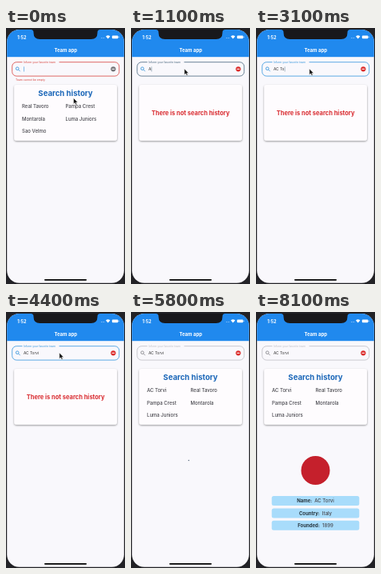
An HTML page for the animation above (8400 ms loop, 149 by 320 pixels).

```html
<!DOCTYPE html>
<html lang="en">
<head>
<meta charset="utf-8">
<title>Team app</title>
<style>
  html, body { margin: 0; width: 100%; height: 100%; overflow: hidden; background: #222226; }
  svg { display: block; width: 100vw; height: 100vh; }
  text { font-family: Inter, Roboto, sans-serif; white-space: pre; }
  .bold { font-weight: 700; }
  .mid { text-anchor: middle; }
  .item { font-size: 6px; font-weight: 500; fill: #47474d; }
</style>
</head>
<body>
<svg viewBox="0 0 149 320">
  <defs>
    <clipPath id="screen"><rect x="1.2" y="2" width="146.600" height="316.700" rx="15.500"/></clipPath>
    <filter id="shadow" x="-10%" y="-10%" width="120%" height="130%">
      <feDropShadow dx="0" dy="1" stdDeviation="1" flood-color="#000" flood-opacity=".42"/>
    </filter>
  </defs>
  <rect width="149" height="320" fill="#222226"/>
  <g clip-path="url(#screen)">
    <rect width="149" height="320" fill="#f9f8fc"/>
    <rect width="149" height="36.200" fill="#2089ee"/>
    <path d="M31 0V2Q34.500 2 34.500 5.500V6Q34.500 14 42.500 14H106.500Q114.500 14 114.500 6V5.500Q114.500 2 118 2V0Z" fill="#18181b"/>
    <g fill="#fff">
      <text class="bold" x="14.200" y="13.500" font-size="5.600">1:52</text>
      <text class="bold mid" x="74.700" y="30.200" font-size="6">Team app</text>
      <g opacity=".6">
        <circle cx="119.500" cy="12.500" r=".5"/><circle cx="121.200" cy="12.500" r=".5"/><circle cx="122.900" cy="12.500" r=".5"/>
      </g>
      <path d="M125 10.500Q127.700 8.100 130.400 10.500L127.700 13.500Z"/>
      <rect x="132.800" y="9.400" width="7.600" height="3.900" rx="1"/>
      <rect x="140.800" y="10.600" width=".7" height="1.500" rx=".3"/>
    </g>

    <rect id="border" x="7.700" y="42.700" width="134" height="17.400" rx="5.500" fill="none" stroke-width=".8"/>
    <rect x="20.500" y="41.500" width="46" height="3" fill="#f9f8fc"/>
    <text id="label" x="22" y="44.300" font-size="3.350">Inform your favorite team</text>
    <g id="lens" fill="none" stroke-width=".85">
      <circle cx="14.200" cy="50.700" r="1.800"/><path d="M15.600 52.100L17.700 54.200"/>
    </g>
    <text id="query" x="22" y="53.200" font-size="4.750" fill="#333" xml:space="preserve"></text>
    <rect id="caret" y="48.300" width=".6" height="6.200"/>
    <circle id="clear" cx="134.300" cy="51.300" r="3.100"/>
    <rect x="132.500" y="50.800" width="3.600" height="1" fill="#fff"/>
    <text id="error" x="12" y="66.300" font-size="3.400" fill="#d8453f">Team cannot be empty</text>

    <rect x="10.200" y="71" width="128.800" height="69.800" rx="3" fill="#fefcfe" filter="url(#shadow)"/>
    <g id="history">
      <text class="bold mid" x="74.500" y="84.700" font-size="9.600" fill="#1a66b8">Search history</text>
      <g id="items"></g>
    </g>
    <text id="none" class="bold mid" x="74.700" y="109" font-size="7.500" fill="#d92b30">There is not search history</text>

    <circle id="spinner" r=".75" fill="#5a6c7c"/>
    <circle id="crest" cx="74.500" cy="198" r="18" fill="#c5202c"/>
    <g id="info"></g>
    <rect x="48" y="313.900" width="53" height="1.900" rx=".95"/>
  </g>
  <path id="mouse" d="M0 0V7.400L1.750 5.900L3 8.600L4.300 8L3.100 5.400H5.400Z" fill="#111" stroke="#fff" stroke-width=".5"/>
</svg>
<script>
const LOOP = 8400;
const TEAM = 'AC Torvi';
const BEFORE = ['Real Tavoro', 'Pampa Crest', 'Montarola', 'Luma Juniors', 'Sao Velmo'];
const AFTER = [TEAM, ...BEFORE.slice(0, 2), 'Montarola', 'Luma Juniors'];
const KEY_TIMES = [1000, 1500, 1900, 2300, 2800, 3400, 3500, 3700];
const RED = [216, 69, 63], SLATE = [72, 102, 126], BLUE = [54, 151, 221], GREY = [190, 190, 196];

const $ = id => document.getElementById(id);
const set = (id, attrs) => {
  for (const key in attrs) $(id).setAttribute(key, attrs[key]);
};
const show = (id, on) => set(id, { visibility: on ? 'visible' : 'hidden' });
const progress = (t, from, to) => Math.min(1, Math.max(0, (t - from) / (to - from)));
const ease = p => p * p * (3 - 2 * p);
const lerp = (a, b, p) => a + (b - a) * p;
const mix = (a, b, p) => `rgb(${a.map((v, i) => Math.round(lerp(v, b[i], p)))})`;

const listTeams = teams => teams.map((name, i) =>
  `<text class="item" x="${i % 2 ? 74.5 : 20}" y="${100.4 + 15.4 * (i >> 1)}">${name}</text>`).join('');

$('info').innerHTML = [['Name', TEAM], ['Country', 'Italy'], ['Founded', '1899']].map(([key, value], i) => {
  const y = 230 + 15.4 * i;
  return `<rect x="19.7" y="${y}" width="109.6" height="12" rx="2.500" fill="#a8dcfb"/>
    <text class="item mid" x="74.500" y="${y + 8.4}"><tspan class="bold" fill="#26343d">${key}:</tspan><tspan dx="3">${value}</tspan></text>`;
}).join('');

let shownTeams;
function showTeams(teams) {
  if (teams === shownTeams) return;
  shownTeams = teams;
  $('items').innerHTML = listTeams(teams);
}

function fieldColor(t) {
  if (t < 1000) return mix(RED, RED, 0);
  if (t < 4600) return mix(SLATE, BLUE, progress(t, 1100, 1300));
  return mix(BLUE, GREY, progress(t, 4600, 4800));
}

function draw(t) {
  const typing = t >= 1000 && t < 4700;
  const color = fieldColor(t);
  set('border', { stroke: color });
  set('label', { fill: color });
  set('lens', { stroke: t < 4700 ? '#3293da' : '#85858a' });
  set('clear', { fill: t < 1000 ? '#747478' : '#dc2e2d' });
  show('error', t < 1000);

  const typed = TEAM.slice(0, KEY_TIMES.filter(k => t >= k).length);
  const query = $('query');
  if (query.textContent !== typed) query.textContent = typed;
  const width = typed ? query.getComputedTextLength() : 0;
  set('caret', { x: 22.3 + width, fill: typed ? '#758da0' : '#3293da' });
  show('caret', t < 4300);

  showTeams(t < 1000 ? BEFORE : AFTER);
  show('history', !typing);
  show('none', typing);

  const angle = Math.PI * (1 + (t - 5800) / 400);
  set('spinner', { cx: 73.5 + 1.2 * Math.cos(angle), cy: 185.6 + 1.2 * Math.sin(angle) });
  show('spinner', t >= 4700 && t < 5900);
  show('info', t >= 5900);
  show('crest', t >= 7000);

  const p = ease(progress(t, 0, 900));
  set('mouse', { transform: `translate(${lerp(84.5, 66.8, p)} ${lerp(87.5, 51, p)})` });
  show('mouse', t < 4700);
}

function frame() {
  draw(performance.now() % LOOP);
  requestAnimationFrame(frame);
}
frame();
</script>
</body>
</html>
```
